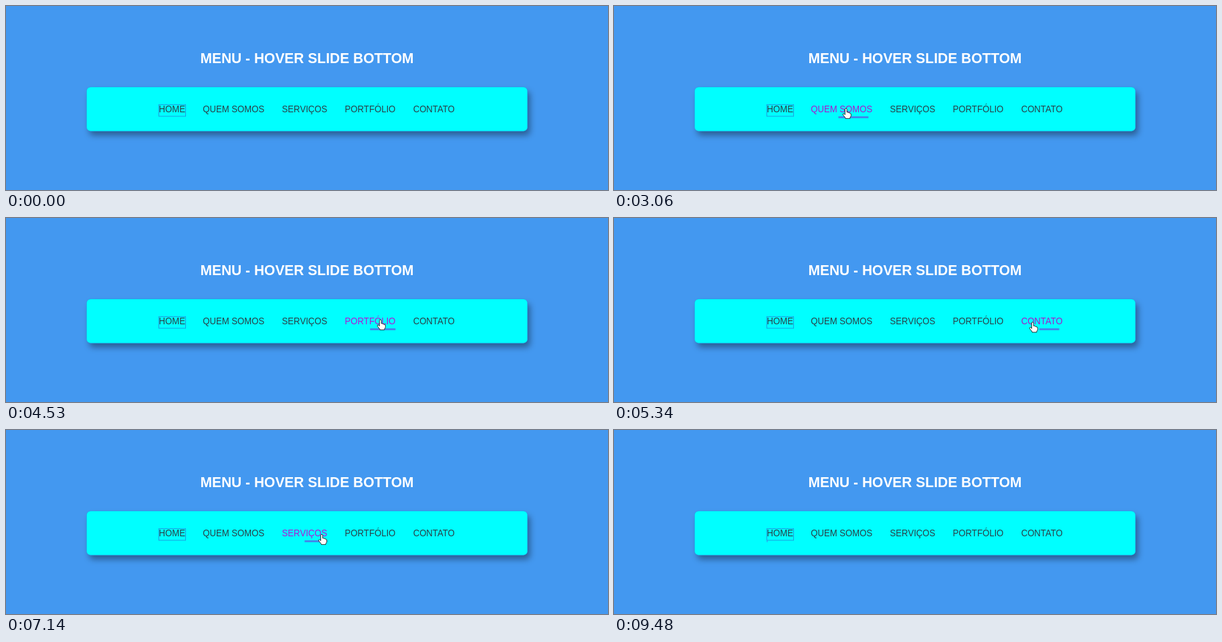
Animation, 900 px wide and 277 px high, one loop 9510 ms. Source, as an HTML page:

```html
<!DOCTYPE html>
<html lang="pt-BR">
<head>
<meta charset="utf-8">
<title>Menu</title>
<style>
  html, body { margin: 0; width: 100%; height: 100%; overflow: hidden; background: #4398f0; }
  svg { display: block; width: 100%; height: 100%; }
  text { font-family: Arial, "Liberation Sans", sans-serif; }
  .title { font-size: 21px; font-weight: bold; fill: #fff; }
  .item { font-size: 13.15px; }
</style>
</head>
<body>
<svg viewBox="0 0 900 277">
  <defs>
    <filter id="shadow" x="-5%" y="-30%" width="110%" height="180%">
      <feDropShadow dx="4" dy="6.5" stdDeviation="4.8" flood-color="#000" flood-opacity=".38"/>
    </filter>
  </defs>
  <rect width="900" height="277" fill="#4398f0"/>
  <rect x="120.5" y="122" width="659" height="66.3" rx="6" fill="#0ff" filter="url(#shadow)"/>
  <rect x="120.5" y="122" width="659" height="66.3" rx="6" fill="none" stroke="#2489d8" stroke-width=".4"/>
  <g id="bars" fill="#3f8ceb"></g>
  <g id="labels" transform="scale(1 1.06)">
    <text class="title" x="450" y="80.7" text-anchor="middle">MENU - HOVER SLIDE BOTTOM</text>
  </g>
  <rect x="228.5" y="148.5" width="40" height="17.5" fill="none" stroke="#1b9fe0"/>
  <g id="cursor" stroke="#111" stroke-width=".9" stroke-linejoin="round" fill="#fff">
    <path id="arrow" d="M0 0V11.2L2.6 8.8L4.3 12.6L6.2 11.8L4.6 8.1H8Z"/>
    <path id="hand" transform="translate(-.4 -.8) scale(.95)" d="M-1.5 10V1.3a1.5 1.3 0 0 1 3 0V6q2.6-.6 2.6.8q2.2-.4 2.2 1q1.7-.2 1.7 1.2V12l-1.6 2.8V16H-.8V15L-4.6 10.2q-.8-1.6.8-2q1 0 2.3 1.8z"/>
  </g>
</svg>
<script>
const LOOP = 9510, FADE = 400, FRAME = 30, STEP = 5;
const LEFT = 228.5, GAP = 26.3, HIT_TOP = 153.4;
const REST = [42, 62, 70], HOVER = [178, 20, 214];
const $ = id => document.getElementById(id);

// key stops of the pointer tip: time, x, y
const stops = [
  [1440, 262, -20], [1950, 244, 153], [2500, 250, 156], [3060, 347, 155],
  [3760, 447, 154], [4530, 560, 154], [5800, 640, 160], [6180, 539, 162],
  [6700, 480, 160], [7140, 472.5, 158], [8100, 285, 155], [8500, 248, 155],
  [9080, 246, 154], [9400, 250, -20]
];
const first = stops[0][0], end = stops[stops.length - 1][0];

function add(parent, tag, attrs) {
  const el = document.createElementNS("http://www.w3.org/2000/svg", tag);
  set(el, attrs);
  return $(parent).appendChild(el);
}

function set(el, attrs) {
  for (const key in attrs) el.setAttribute(key, attrs[key]);
}

// cubic-bezier(.25, .1, .25, 1)
function ease(x) {
  if (x <= 0) return 0;
  if (x >= 1) return 1;
  const bez = (s, a, b) => 3 * a * s * (1 - s) ** 2 + 3 * b * s * s * (1 - s) + s ** 3;
  let lo = 0, hi = 1;
  for (let i = 0; i < 20; i++) {
    const mid = (lo + hi) / 2;
    if (bez(mid, .25, .25) < x) lo = mid; else hi = mid;
  }
  return bez(lo, .1, 1);
}

// smooth curve through the stops, without overshoot
function pointAt(t) {
  let i = 0;
  while (i < stops.length - 2 && stops[i + 1][0] <= t) i++;
  const a = stops[i], b = stops[i + 1], span = b[0] - a[0], s = (t - a[0]) / span;
  const before = stops[i - 1] || a, after = stops[i + 2] || b;
  return [1, 2].map(k => {
    const d = b[k] - a[k];
    const slope = (p, q) => {
      const m = (q[k] - p[k]) / (q[0] - p[0]) * span;
      return m * d <= 0 ? 0 : Math.sign(d) * Math.min(Math.abs(m), 3 * Math.abs(d));
    };
    const u = s * s, v = u * s;
    return a[k] + d * (3 * u - 2 * v) + slope(before, b) * (v - 2 * u + s) + slope(a, after) * (v - u);
  });
}

// times at which the pointer enters and leaves a label
function findSpans(left, width) {
  const spans = [];
  let inside = false;
  for (let t = first; t <= end; t += STEP) {
    const [x, y] = pointAt(t);
    const hit = x >= left && x <= left + width && y >= HIT_TOP;
    if (hit && !inside) spans.push([t, end]);
    if (!hit && inside) spans[spans.length - 1][1] = t;
    inside = hit;
  }
  return spans;
}

let nextX = LEFT;
const items = ["HOME", "QUEM SOMOS", "SERVIÇOS", "PORTFÓLIO", "CONTATO"].map(label => {
  const x = nextX;
  const text = add("labels", "text", { class: "item", x, y: 151 });
  text.textContent = label;
  const w = text.getComputedTextLength();
  nextX += w + GAP;
  return { x, w, text, bar: add("bars", "rect", { y: 166, height: 3 }), spans: findSpans(x, w) };
});

function progress(spans, t) {
  return spans.reduce((p, [a, b]) => {
    const peak = ease((b - a) / FADE);
    return p + (t < b ? ease((t - a) / FADE) : peak * (1 - ease((t - b) / FADE)));
  }, 0);
}

function draw(t) {
  let over = false;
  for (const { x, w, spans, bar, text } of items) {
    const now = progress(spans, t), last = progress(spans, t - FRAME);
    const lo = Math.min(now, last), hi = Math.max(now, last);
    // the bar grows to half the label while sliding to its right half
    set(bar, {
      x: x + w / 2 * lo,
      width: hi > .0005 ? Math.max(1, w * hi - w / 2 * lo) : 0
    });
    text.setAttribute("fill", `rgb(${REST.map((c, i) => Math.round(c + (HOVER[i] - c) * now))})`);
    over = over || spans.some(([a, b]) => t >= a && t < b);
  }
  const shown = t >= first && t < end;
  $("cursor").style.display = shown ? "" : "none";
  if (!shown) return;
  $("cursor").setAttribute("transform", `translate(${pointAt(t)})`);
  $("hand").style.display = over ? "" : "none";
  $("arrow").style.display = over ? "none" : "";
}

const start = performance.now();
function tick() {
  draw((performance.now() - start) % LOOP);
  requestAnimationFrame(tick);
}
tick();
</script>
</body>
</html>
```
